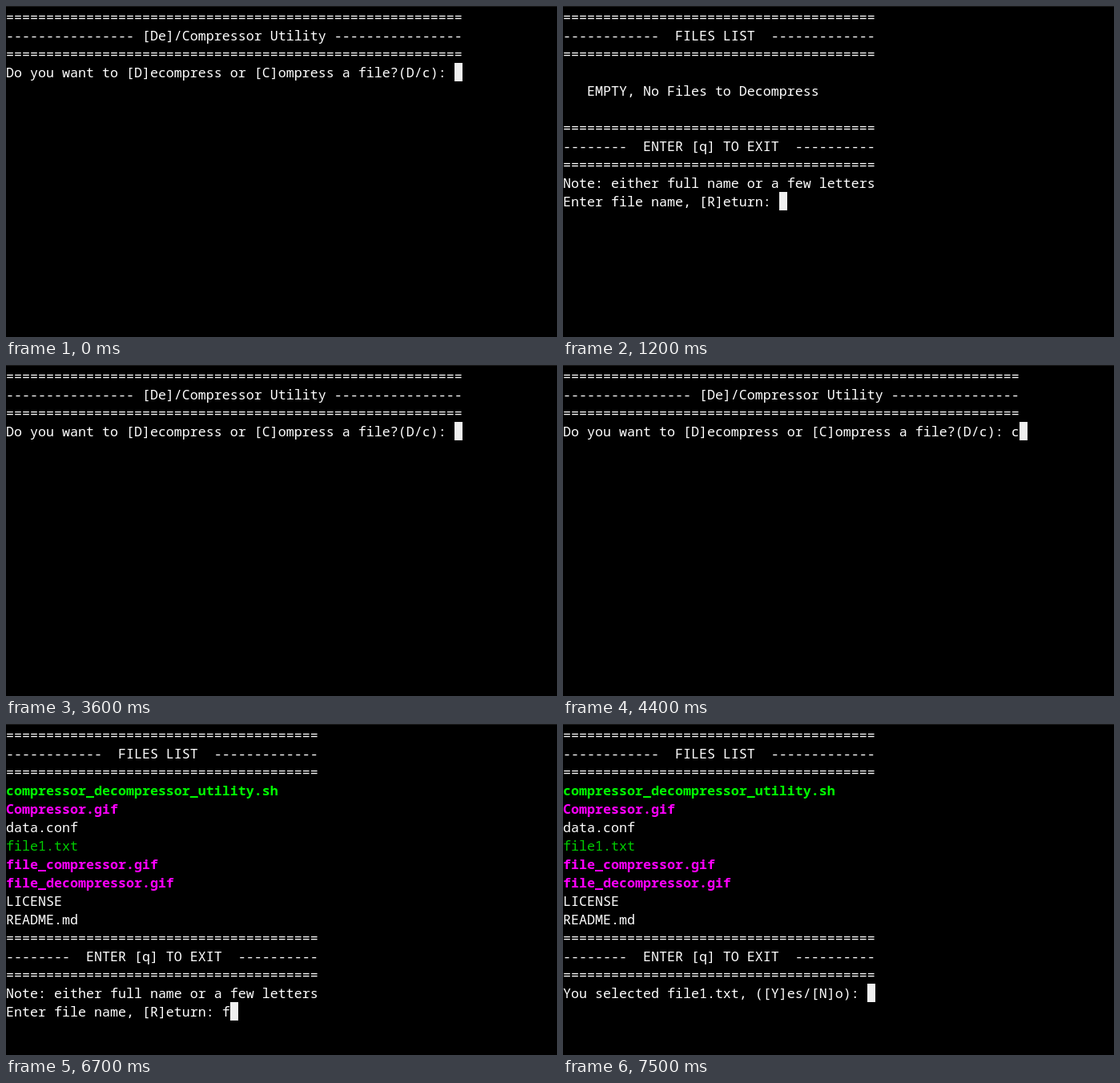
Animation of 688x413 px, one loop 8000 ms. Source, as an HTML page:

```html
<!DOCTYPE html>
<html lang="en">
<head>
<meta charset="utf-8">
<title>Terminal</title>
<style>
  html, body { margin: 0; width: 100%; height: 100%; overflow: hidden; background: #000; }
  body { position: relative; border-top: 1px solid #1a1a1a; box-sizing: border-box; }
  pre {
    position: absolute; left: 0; top: 1px; margin: 0;
    font: 16.6667px/23px "Noto Sans Mono", "DejaVu Sans Mono", monospace;
    font-variant-ligatures: none; color: #fff;
  }
  .row { height: 23px; }
  .exec { color: #0f0; font-weight: 700; }
  .image { color: #f0f; font-weight: 700; }
  .match { color: #00cd00; }
  #cursor { position: absolute; width: 10px; height: 23px; background: #f0f0f0; }
</style>
</head>
<body>
<pre id="screen"></pre>
<script>
  const LOOP = 8000, CELL = 10, ROW = 23;
  const screen = document.getElementById('screen');

  const wide = '='.repeat(57), rule = '='.repeat(39);
  const menu = [
    wide,
    '-'.repeat(16) + ' [De]/Compressor Utility ' + '-'.repeat(16),
    wide
  ];
  const question = 'Do you want to [D]ecompress or [C]ompress a file?(D/c): ';
  const listing = files => [
    rule, '-'.repeat(12) + '  FILES LIST  ' + '-'.repeat(13), rule,
    ...files,
    rule, '-'.repeat(8) + '  ENTER [q] TO EXIT  ' + '-'.repeat(10), rule
  ];
  const note = 'Note: either full name or a few letters';
  const ask = 'Enter file name, [R]eturn: ';

  const empty = listing(['', '   EMPTY, No Files to Decompress', '']);
  const full = listing([
    ['compressor_decompressor_utility.sh', 'exec'],
    ['Compressor.gif', 'image'],
    'data.conf',
    ['file1.txt', 'match'],
    ['file_compressor.gif', 'image'],
    ['file_decompressor.gif', 'image'],
    'LICENSE',
    'README.md'
  ]);

  // [start in ms, rows]; the cursor follows the last row
  const steps = [
    [0, [...menu, question]],
    [600, [...menu, question + 'd']],
    [1100, [...menu, question + 'd', '']],
    [1200, [...empty, note, ask]],
    [3300, [...empty, note, ask + 'r']],
    [3600, [...menu, question]],
    [4400, [...menu, question + 'c']],
    [4600, [...full, note, ask]],
    [6700, [...full, note, ask + 'f']],
    [6800, [...full, note, ask + 'fi']],
    [7500, [...full, 'You selected file1.txt, ([Y]es/[N]o): ']]
  ];

  function draw(rows) {
    const nodes = rows.map(row => {
      const [text, style = ''] = [].concat(row);
      const el = document.createElement('div');
      el.className = 'row ' + style;
      el.textContent = text;
      return el;
    });
    const cursor = document.createElement('div');
    cursor.id = 'cursor';
    cursor.style.left = rows[rows.length - 1].length * CELL + 'px';
    cursor.style.top = (rows.length - 1) * ROW + 'px';
    screen.replaceChildren(...nodes, cursor);
  }

  let shown = null;
  const start = performance.now();
  function tick() {
    const t = (performance.now() - start) % LOOP;
    const step = steps.filter(s => s[0] <= t).pop();
    if (step !== shown) draw((shown = step)[1]);
    requestAnimationFrame(tick);
  }
  tick();
</script>
</body>
</html>
```
